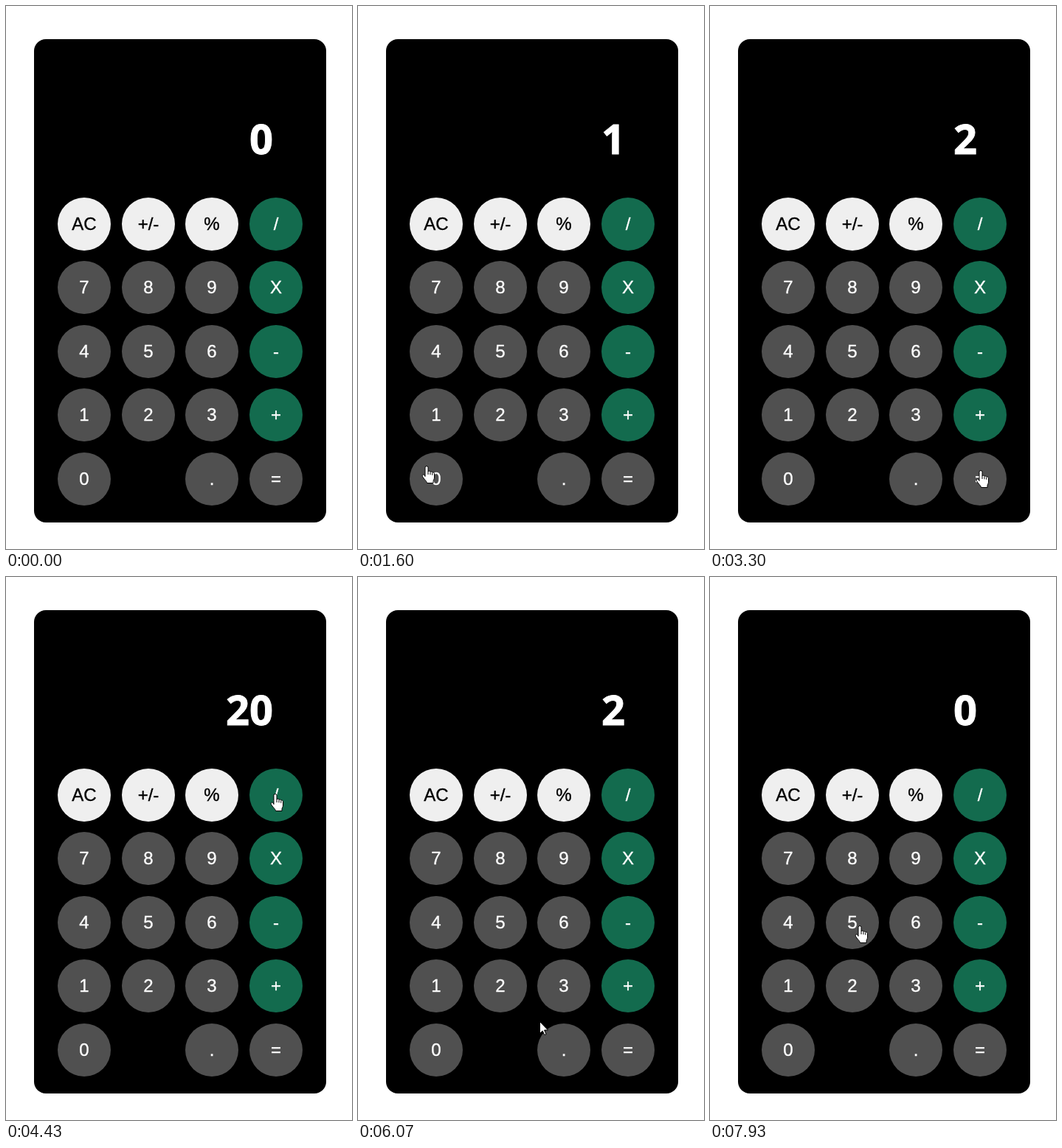
An HTML page that plays this animation: 469x737 px, repeating every 8000 ms.

```html
<!DOCTYPE html>
<html lang="en">
<head>
<meta charset="utf-8">
<title>Calculator</title>
<style>
  html, body { margin: 0; width: 100%; height: 100%; overflow: hidden; background: #fff; }
  svg { display: block; }
  .key { font: 24px "Liberation Sans", Arial, sans-serif; text-anchor: middle; stroke-width: .35; }
  #display { font: bold 56px "Open Sans", "Noto Sans", sans-serif; text-anchor: end; fill: #fff; stroke: #fff; stroke-width: .9; }
  .cursor { fill: #fff; stroke: #000; stroke-linejoin: round; }
</style>
</head>
<body>
<svg width="469" height="737" viewBox="0 0 469 737">
  <rect x="38" y="45" width="396" height="656" rx="16"/>
  <text id="display" x="362" y="201">0</text>
  <g id="keys"></g>
  <g id="pointer">
    <path id="arrow" class="cursor" d="M.5 .5V16.5L4.2 13L6.8 18.5L9 17.5L6.6 12H11.5Z"/>
    <g id="hand" class="cursor" transform="translate(-6 0)">
      <path d="M5 14.5V2.5a2 2 0 0 1 4 0V8c0-1.2 3-1.2 3 .6c.3-1 2.8-.7 2.8 .8c.5-.8 2.7-.3 2.7 1.2V16c0 2.2-1.5 3.5-1.5 5v2.5H7.5c0-2.5-4.5-5.5-6-9c-1-2.3 1.2-3.3 2.5-1.6z"/>
      <path d="M9 8v4M12 9v3.3M14.8 10v2.8" fill="none"/>
    </g>
  </g>
</svg>
<script>
const LOOP = 8000, STEP = 100 / 3, RADIUS = 36, PITCH = 86.5;
const $ = id => document.getElementById(id);

const layout = ["AC +/- % /", "7 8 9 X", "4 5 6 -", "1 2 3 +", "0 _ . ="];
const keys = {};

function add(tag, attrs, text = "") {
  const el = document.createElementNS("http://www.w3.org/2000/svg", tag);
  for (const name in attrs) el.setAttribute(name, attrs[name]);
  el.textContent = text;
  $("keys").append(el);
}

layout.forEach((row, r) => row.split(" ").forEach((label, c) => {
  if (label === "_") return;
  const x = Math.round(106 + c * PITCH), y = Math.round(296 + r * PITCH - r / 10);
  const operator = "/X-+".includes(label), light = r === 0 && !operator;
  const fill = operator ? "#136b4e" : light ? "#efefef" : "#505050";
  const ink = light ? "#000" : "#fff";
  keys[label] = { x, y };
  add("circle", { cx: x, cy: y, r: RADIUS, fill });
  add("text", { class: "key", x, y: y + 8, fill: ink, stroke: ink }, label);
}));

// Each move: key, start, end, offset from the key's centre, sideways bend, time of the click
const moves = [
  ["1", 170, 970, 15, -6, -70],
  ["1", 1100, 1230, 7, -8, 0, 1490],
  ["0", 1467, 1625, -15, -12, 0, 1765],
  ["X", 1770, 2230, 4, 3, 0, 2360],
  ["2", 2340, 2750, 19, 7, 0, 2830],
  ["=", 2850, 3300, 0, -12, 0, 3460],
  ["/", 3700, 4460, -2, -3, -17, 4630],
  ["5", 4600, 5300, -17, 6, -65],
  ["2", 5430, 5630, 2, 19, -14, 5760],
  ["=", 5740, 6600, -12, 23, 0, 6460],
  ["+", 6740, 6930, 28, 1, 0],
  ["+", 7020, 7330, -5, -4, 0, 7530],
  ["5", 7500, 7930, 9, 4, 0]
];

const ease = u => u * u * (3 - 2 * u);

function pointerAt(t) {
  let x = 488, y = 351;
  for (const [key, start, end, dx, dy, bend] of moves) {
    if (t <= start) break;
    const e = ease(Math.min(1, (t - start) / (end - start)));
    const w = keys[key].x + dx - x, h = keys[key].y + dy - y;
    const side = bend * 4 * e * (1 - e) / Math.hypot(w, h);
    x += w * e - h * side;
    y += h * e + w * side;
  }
  return [Math.round(x), Math.round(y)];
}

const operate = {
  "/": (a, b) => a / b,
  "X": (a, b) => a * b,
  "-": (a, b) => a - b,
  "+": (a, b) => a + b
};

function valueAt(t) {
  let value = 0, stored = 0, operator = "+";
  for (const [key, , , , , , click] of moves) {
    if (!(click <= t)) continue;
    if (key === "=") value = operate[operator](stored, value);
    else if (operate[key]) [stored, operator, value] = [value, key, 0];
    else value = value * 10 + Number(key);
  }
  return value;
}

function draw(now) {
  const t = Math.floor((now % LOOP + 4) / STEP) * STEP;
  const [x, y] = pointerAt(t);
  const over = Object.values(keys).some(k => Math.hypot(x - k.x, y - k.y) < RADIUS);
  $("pointer").setAttribute("transform", `translate(${x} ${y})`);
  $("hand").style.display = over ? "" : "none";
  $("arrow").style.display = over ? "none" : "";
  $("display").textContent = valueAt(t);
}

const start = performance.now();
function tick() {
  draw(performance.now() - start);
  requestAnimationFrame(tick);
}
tick();
</script>
</body>
</html>
```
